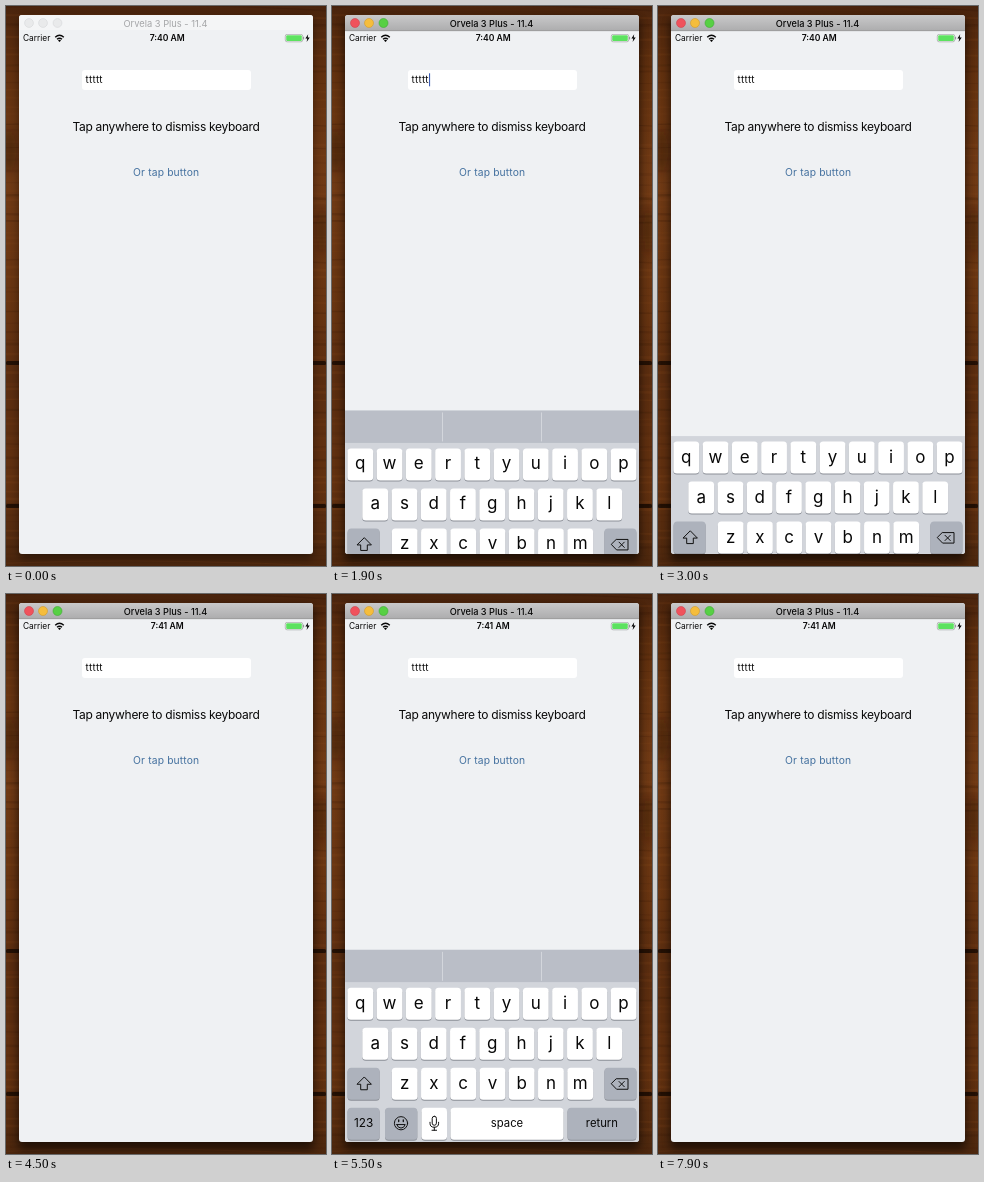
Animation, 320 px wide and 560 px high, one loop 8000 ms. Source, as an HTML page:

```html
<!DOCTYPE html>
<html lang="en">
<head>
<meta charset="utf-8">
<title>Dismiss keyboard</title>
<style>
html, body { margin: 0; width: 100%; height: 100%; overflow: hidden; background: #47240d; }
svg { display: block; width: 320px; height: 560px; }
text { font-family: Inter, Roboto, sans-serif; fill: #080808; }
.mid { text-anchor: middle; }
.line { fill: none; stroke: #111; stroke-width: 1; stroke-linejoin: round; stroke-linecap: round; }
</style>
</head>
<body>
<svg viewBox="0 0 320 560">
  <defs>
    <linearGradient id="wood" x2="0" y2="1">
      <stop offset="0" stop-color="#4a240d"/>
      <stop offset=".12" stop-color="#62310f"/>
      <stop offset=".3" stop-color="#703a15"/>
      <stop offset=".55" stop-color="#673411"/>
      <stop offset=".66" stop-color="#5a2d10"/>
      <stop offset=".85" stop-color="#623110"/>
      <stop offset="1" stop-color="#4c270e"/>
    </linearGradient>
    <linearGradient id="bar" x2="0" y2="1">
      <stop offset="0" stop-color="#c9c9ca"/>
      <stop offset="1" stop-color="#acacad"/>
    </linearGradient>
    <filter id="blur" x="-10%" y="-10%" width="120%" height="120%"><feGaussianBlur stdDeviation="5"/></filter>
    <clipPath id="win"><rect x="13" y="9" width="294" height="539" rx="3"/></clipPath>
  </defs>

  <rect width="320" height="560" fill="url(#wood)"/>
  <g id="grain"></g>
  <g fill="#1d0b02" opacity=".35" filter="url(#blur)">
    <ellipse cx="3" cy="145" rx="7" ry="22"/>
    <ellipse cx="316" cy="225" rx="5" ry="26"/>
  </g>
  <rect x="13" y="12" width="294" height="541" rx="4" opacity=".42" filter="url(#blur)"/>
  <rect id="shade" x="12" y="14" width="296" height="543" rx="4" opacity="0" filter="url(#blur)"/>

  <g clip-path="url(#win)">
    <rect x="13" y="9" width="294" height="539" fill="#eff1f3"/>

    <g id="idle">
      <rect x="13" y="9" width="294" height="15" fill="#f4f5f6"/>
      <g fill="#e9eaeb" stroke="#d6d7d9" stroke-width=".6">
        <circle cx="23" cy="17" r="4.4"/><circle cx="37" cy="17" r="4.4"/><circle cx="51.5" cy="17" r="4.4"/>
      </g>
      <text class="mid" x="159.5" y="20.5" font-size="9.3" style="fill:#a5a6a8">Orvela 3 Plus - 11.4</text>
    </g>
    <g id="active">
      <rect x="13" y="9" width="294" height="16" fill="url(#bar)"/>
      <path d="M13 24.7H307" stroke="#8f8f91" stroke-width=".6"/>
      <g stroke-width=".6">
        <circle cx="23" cy="17" r="4.5" fill="#f0525c" stroke="#cf4350"/>
        <circle cx="37" cy="17" r="4.5" fill="#f5bd3c" stroke="#d19b2c"/>
        <circle cx="51.5" cy="17" r="4.5" fill="#57d044" stroke="#3faa34"/>
      </g>
      <text class="mid" x="159.5" y="20.5" font-size="9.2" font-weight="500">Orvela 3 Plus - 11.4</text>
    </g>

    <text x="17" y="35.3" font-size="8.4">Carrier</text>
    <g fill="none" stroke="#080808" stroke-width="1.4">
      <path d="M49.2 31.2Q53.5 27.4 57.8 31.2"/><path d="M51 33.2Q53.5 31.1 56 33.2"/>
    </g>
    <path d="M52 34.4Q53.5 33.3 55 34.4L53.5 36Z"/>
    <text id="before" class="mid" x="161.2" y="35.3" font-size="8.6" font-weight="600">7:40 AM</text>
    <text id="after" class="mid" x="161.2" y="35.3" font-size="8.6" font-weight="600">7:41 AM</text>
    <rect x="279.3" y="28.4" width="17.4" height="7.4" rx="1.8" fill="#fff" stroke="#8b908d" stroke-width=".6"/>
    <rect x="280.2" y="29.3" width="15.6" height="5.6" rx="1" fill="#5ce25f"/>
    <path d="M297.6 30.8V33.4" stroke="#8b908d"/>
    <path d="M302.2 28.3L299.4 32.6H301.3L300.6 36L303.7 31.4H301.7Z"/>

    <rect x="76" y="64" width="169" height="20" rx="3" fill="#fff"/>
    <text x="79.6" y="77.2" font-size="9.9" letter-spacing=".2">ttttt</text>
    <rect id="caret" x="97" y="67.3" width="1.1" height="13" fill="#3f5fb5"/>
    <text class="mid" x="160" y="124.6" font-size="12" letter-spacing="-.3">Tap anywhere to dismiss keyboard</text>
    <text id="button" class="mid" x="160.2" y="170.4" font-size="10.3" letter-spacing=".14" style="fill:#44719f">Or tap button</text>

    <g id="keyboard">
      <g id="hints">
        <rect x="13" y="355" width="294" height="33" fill="#babec7"/>
        <path d="M110.5 357V386M209.5 357V386" stroke="#d3d6dc"/>
      </g>
      <rect x="13" y="387.5" width="294" height="161" fill="#d2d5db"/>
      <g id="keys"></g>
      <path class="line" d="M32 482.5L25 489.5H28.7V495H35.3V489.5H39Z"/>
      <path class="line" d="M284.6 484H296V494.5H284.6L279.5 489.2ZM287 486.7L292.3 492M292.3 486.7L287 492"/>
      <g class="line">
        <circle cx="69" cy="528.5" r="6.6"/>
        <path d="M64.8 529.8H73.2Q72.2 533.3 69 533.3T64.8 529.8"/>
        <path d="M66.7 525.2V526.8M71.3 525.2V526.8" stroke-width="1.3"/>
        <rect x="100.2" y="521.5" width="4.2" height="9" rx="2.1"/>
        <path d="M98 527.5V528.5Q98 532.5 102.3 532.5T106.6 528.5V527.5M102.3 532.5V535.5M100 535.5H104.6"/>
      </g>
    </g>
  </g>
</svg>
<script>
const LOOP = 8000, STEP = 100;
const $ = id => document.getElementById(id);

function add(parent, tag, attrs, label) {
  const el = document.createElementNS("http://www.w3.org/2000/svg", tag);
  for (const name in attrs) el.setAttribute(name, attrs[name]);
  if (label) el.textContent = label;
  parent.append(el);
}

// Wood planks: soft horizontal grain and two seams
let seed = 7;
const rand = () => (seed = seed * 16807 % 2147483647) / 2147483647;
for (let y = 1; y < 560; y += 4 + rand() * 8) {
  const bend = y + rand() * 12 - 6;
  add($("grain"), "path", {
    d: `M0 ${y}Q160 ${bend} 320 ${y + rand() * 4}`, fill: "none",
    stroke: rand() < .6 ? "#2a1204" : "#8a4b1e",
    "stroke-width": 1 + rand() * 2, opacity: .05 + rand() * .15
  });
}
for (const y of [355, 498]) {
  add($("grain"), "rect", { x: 0, y, width: 320, height: 4, rx: 1.5, fill: "#180a03", opacity: .8 });
}

function key(x, y, w, label, size, dark) {
  const box = { x, width: w, height: 32, rx: 3.5 };
  add($("keys"), "rect", { ...box, y: y + 1, fill: "#8b8f97" });
  add($("keys"), "rect", { ...box, y, fill: dark ? "#adb2bc" : "#fff" });
  if (label) add($("keys"), "text", {
    class: "mid", x: x + w / 2, y: y + (size > 14 ? 21 : 19), "font-size": size
  }, label);
}
const rows = [["qwertyuiop", 15.4, 393], ["asdfghjkl", 30.3, 433], ["zxcvbnm", 59.8, 473]];
for (const [letters, x, y] of rows) {
  [...letters].forEach((c, i) => key(x + i * 29.25, y, 25.8, c, 17));
}
key(15.6, 473, 32, "", 0, true);
key(272.4, 473, 32, "", 0, true);
key(15.6, 513, 32, "123", 11.8, true);
key(53, 513, 32.3, "", 0, true);
key(89.5, 513, 25.5, "", 0);
key(118.5, 513, 113, "space", 11.3);
key(235.5, 513, 68.8, "return", 11.3, true);

const tracks = [];
function track(id, frames) {
  const anim = $(id).animate(frames, { duration: LOOP, fill: "both" });
  anim.pause();
  tracks.push(anim);
}

// Hard opacity changes from [time, opacity] pairs
function flip(id, steps) {
  const frames = steps.map(([t, opacity]) => ({ offset: t / LOOP, opacity, easing: "steps(1, end)" }));
  track(id, [...frames, { offset: 1, opacity: steps.at(-1)[1] }]);
}

flip("idle", [[0, 1], [1200, 0]]);
flip("active", [[0, 0], [1200, 1]]);
flip("shade", [[0, 0], [1200, .3]]);
flip("before", [[0, 1], [3900, 0]]);
flip("after", [[0, 0], [3900, 1]]);
flip("caret", [[0, 0], [1600, 1], [2200, 0], [2600, 1], [2900, 0],
               [4900, 1], [5500, 0], [5900, 1], [6200, 0]]);
flip("hints", [[0, 1], [2900, 0], [3600, 1], [6200, 0], [6900, 1]]);
flip("button", [[0, 1], [6200, .05], [6400, 1]]);

const slide = [[0, 193], [1632, 193], [2232, 0], [2900, 0], [3500, 193],
               [4950, 193], [5550, 0], [6200, 0], [6800, 193], [LOOP, 193]];
track("keyboard", slide.map(([t, y]) => ({
  offset: t / LOOP, transform: `translateY(${y}px)`, easing: "ease"
})));

const start = performance.now();
function draw() {
  const t = (performance.now() - start) % LOOP;
  const now = Math.floor(t / STEP) * STEP;
  for (const anim of tracks) anim.currentTime = now;
  requestAnimationFrame(draw);
}
draw();
</script>
</body>
</html>
```
